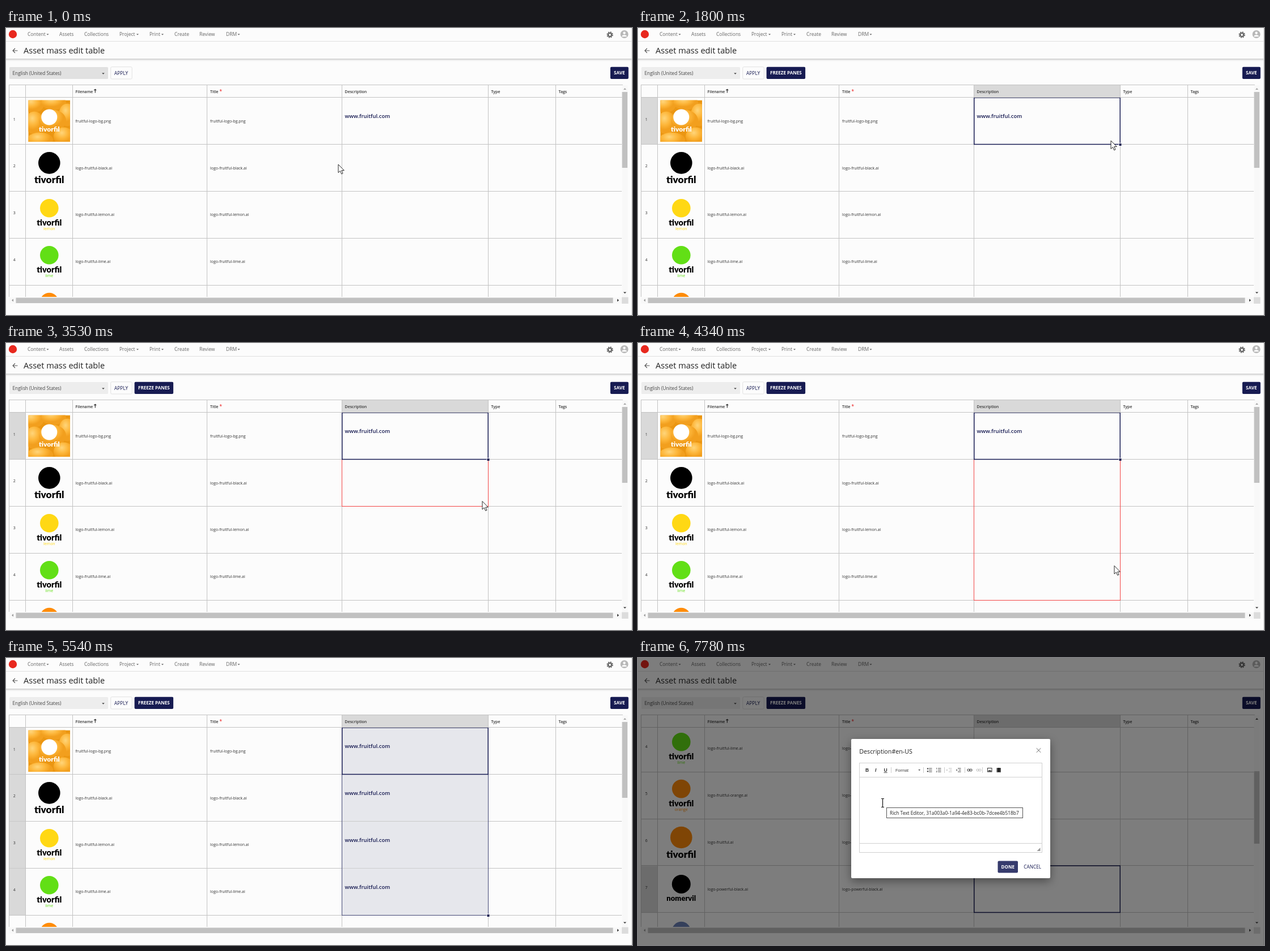
An HTML page for the animation above (8000 ms loop, 1104 by 507 pixels).

```html
<!DOCTYPE html>
<html lang="en">
<head>
<meta charset="utf-8">
<title>Asset mass edit table</title>
<style>
  html, body { margin: 0; width: 100%; height: 100%; overflow: hidden; background: #fcfcfc; }
  svg { display: block; font-family: "Open Sans", "Noto Sans", sans-serif; white-space: pre; }
</style>
</head>
<body>
<svg id="stage" width="1104" height="507" viewBox="0 0 1104 507"></svg>
<script>
const LOOP = 8000, ROW = 82.9, TOP = 123;
const NAVY = '#171b52', GRID = '#c3c3c3', PAGE = '#fcfcfc', MARKED = '#d9d9d9';
const COLS = [5.5, 34.5, 117.5, 354.5, 592.5, 850.5, 969.5];

// Pointer stops: start time, x, y
const STOPS = [
  [0, 586, 241], [560, 626, 209], [710, 641, 195], [860, 644, 191], [980, 645, 188],
  [1410, 690, 191], [1530, 770, 195], [1650, 822, 197], [1800, 834, 199], [1920, 841, 200],
  [2070, 846, 200], [2220, 848, 202], [2340, 849, 203], [2490, 850.5, 205],
  [3110, 848, 212], [3230, 847, 227], [3380, 842, 259], [3530, 840, 279.5],
  [3680, 840, 300], [3800, 840, 328], [3920, 840, 356], [4040, 840, 381],
  [4190, 840, 391], [4340, 840, 393.5], [5270, 902, 422], [5420, 969, 490],
  [5540, 1200, 600], [6800, 645, 393], [7200, 540, 322], [7320, 432.5, 256.5], [7470, 431.5, 256]
];

const ASSETS = [
  { file: 'fruitful-logo-bg.png', photo: true },
  { file: 'logo-fruitful-black.ai', color: '#000' },
  { file: 'logo-fruitful-lemon.ai', color: '#ffd814', sub: 'lemon' },
  { file: 'logo-fruitful-lime.ai', color: '#62df16', sub: 'lime' },
  { file: 'logo-fruitful-orange.ai', color: '#ff8c0a', sub: 'orange' },
  { file: 'logo-fruitful.ai', color: '#ff8c0a' },
  { file: 'logo-powerful-black.ai', color: '#000', word: 'nomervil' },
  { file: '', color: '#6a80b8', word: 'nomervil' }
];

const rect = (x, y, w, h, fill, more = '') =>
  `<rect x="${x}" y="${y}" width="${w}" height="${h}" fill="${fill}" ${more}/>`;
const frame = (x, y, w, h, color, width = 1) =>
  rect(x, y, w, h, 'none', `stroke="${color}" stroke-width="${width}"`);
const path = (d, stroke, width = 1, fill = 'none', more = '') =>
  `<path d="${d}" fill="${fill}" stroke="${stroke}" stroke-width="${width}" ${more}/>`;
const circle = (x, y, r, fill) => `<circle cx="${x}" cy="${y}" r="${r}" fill="${fill}"/>`;
const text = (x, y, s, size, fill = '#333', weight = 400, more = '') =>
  `<text x="${x}" y="${y}" font-size="${size}" fill="${fill}" font-weight="${weight}" ${more}>${s}</text>`;
const caret = (x, y, fill = '#555', r = 2) => path(`M${x - r} ${y}h${2 * r}l${-r} ${r}z`, 'none', 0, fill);
const button = (x, y, w, h, label, fill) =>
  rect(x, y, w, h, fill, 'rx="2"') +
  text(x + w / 2, y + h / 2 + 2.9, label, 8.05, '#fff', 700, 'text-anchor="middle"');
const wordmark = (y, s, size, fill) =>
  text(76.3, y, s, size, fill, 900, 'text-anchor="middle" font-family="Lato, sans-serif"');

function photo(y) {
  const fruit = [[48, 8, 19, 14], [84, 4, 22, 13], [108, 26, 15, 20], [50, 40, 17, 20], [82, 36, 24, 19], [60, 70, 23, 13], [102, 64, 18, 16]];
  return `<svg x="39.5" y="${y}" width="73.5" height="73.5" viewBox="39.5 0 73.5 73.5">` +
    rect(39, 0, 75, 75, '#eb9612') +
    fruit.map(([x, cy, rx, ry]) =>
      `<ellipse cx="${x}" cy="${cy}" rx="${rx}" ry="${ry}" fill="url(#peel)"/>`).join('') +
    circle(76.3, 30, 14, '#fff') + wordmark(55.5, 'tivorfil', 12, '#fff') + '</svg>';
}

function thumb(a, y) {
  if (a.photo) return photo(y + 4.5);
  if (a.word) return circle(76.3, y + 32, 16.5, a.color) + wordmark(y + 62, a.word, 13, '#000');
  if (!a.sub) return circle(76.3, y + 32.5, 19.3, a.color) + wordmark(y + 68, 'tivorfil', 17.3, '#000');
  return circle(76.3, y + 29.5, 16.3, a.color) + wordmark(y + 60, 'tivorfil', 14.5, '#000') +
    text(76.3, y + 68, a.sub, 7, a.color, 500, 'text-anchor="middle"');
}

function header() {
  const nav = [[38, 'Content', 73.5], [94, 'Assets'], [138, 'Collections'], [200, 'Project', 232],
    [253, 'Print', 276], [297, 'Create'], [341, 'Review'], [388, 'DRM', 410.5]];
  return rect(0, 23, 1104, 1, '#e0e0e0') + rect(0, 54.5, 1104, 1.2, '#b4b4b4') + rect(0, 55.7, 1104, 2.5, '#efefef') +
    rect(1103, 0, 1, 507, '#e0e0e0') +
    circle(12, 11, 7.2, '#e8281e') +
    nav.map(([x, s, c]) => text(x, 14.2, s, 8.5, '#666', 500) + (c ? caret(c, 10.5) : '')).join('') +
    `<circle cx="1065" cy="12" r="4.7" fill="none" stroke="#666" stroke-width="2" stroke-dasharray="2.1 1.59"/>` +
    `<circle cx="1065" cy="12" r="3" fill="none" stroke="#666" stroke-width="2.2"/>` +
    circle(1090.5, 11, 7, '#b8b8b8') + circle(1090.5, 8.8, 2.2, '#fff') +
    path('M1086.2 15.2q0-3 4.3-3t4.3 3z', 'none', 0, '#fff') +
    path('M20.5 40H12M16 36l-4 4 4 4', '#555', 1.1) +
    text(31, 45, 'Asset mass edit table', 14.55, '#222', 500);
}

function toolbar(selected) {
  return rect(6, 69, 174, 21, selected ? '#ededed' : '#e1e1e1', 'rx="1.5"') +
    text(11.5, 83, 'English (United States)', 8.28, '#444') + caret(171.5, 79.5, '#333', 2.3) +
    rect(184.7, 68.7, 37.5, 21.3, PAGE, 'rx="2" stroke="#e2e2e2"') + text(191, 82.5, 'APPLY', 8.4, NAVY, 500) +
    (selected ? button(226.6, 68.7, 68.5, 21.4, 'FREEZE PANES', NAVY) : '') +
    button(1065.8, 68.7, 32, 21.4, 'SAVE', NAVY);
}

function tableHead(selected) {
  const label = (x, s) => text(x, 114.6, s, 7, '#333', 600);
  return rect(5, 100, 1083, 22.5, PAGE) + (selected ? rect(592.5, 101, 258, 22, MARKED) : '') +
    label(122.5, 'Filename') + path('M157.3 114.5v-6M155.3 110.2l2-2 2 2', '#222', 1.1) +
    label(360, 'Title') + text(376.5, 115, '*', 8, '#e33', 600) +
    label(597.5, 'Description') + label(855.5, 'Type') + label(974.5, 'Tags') +
    path('M5 100.5H1087.5V123M5 122.5H1087' + COLS.map(x => `M${x} 100.5V123`).join(''), GRID);
}

function scrollbars(scrolled) {
  return rect(1086.5, 101, 10, 374, '#f8f8f8') + rect(5, 476, 1081, 10.5, '#f8f8f8') +
    rect(1086.5, scrolled ? 200 : 113, 9.5, scrolled ? 128 : 134, '#c1c1c1') +
    rect(17.5, 476.5, 1053, 9.5, '#c1c1c1') + rect(1086, 475.5, 11.5, 11.5, '#dcdcdc') +
    path('M1088.9 109l2.5-3 2.5 3z', 'none', 0, scrolled ? '#444' : '#a5a5a5') +
    caret(1091.4, 466.5, '#333', 2.6) +
    path('M13 478.5v5l-3-2.5z', 'none', 0, '#999') + path('M1078 478.5v5l3-2.5z', 'none', 0, '#333');
}

function table({ scroll, from, to, filled, drag }) {
  const rowY = i => TOP + i * ROW - scroll;
  const lineY = i => Math.round(rowY(i)) - .5;
  let s = '';
  ASSETS.forEach((a, i) => {
    const y = rowY(i);
    if (y < TOP - ROW || y > 475) return;
    if (i >= from && i <= to) s += rect(5.5, y, 29, ROW, MARKED);
    s += thumb(a, y) + text(12.7, y + 40.5, i + 1, 7, '#333', 500) +
      text(122.5, y + 43.6, a.file, 6.95) + text(360, y + 43.6, a.file, 6.95);
    if (filled && i <= to) s += rect(592.5, y, 258, ROW, '#e6e7ec');
    if (!scroll && (!i || filled && i <= to)) s += text(597.5, y + 36, 'www.fruitful.com', 9.5, NAVY, 600);
    s += path(`M5 ${lineY(i + 1)}H1086`, GRID);
  });
  s += path(COLS.map(x => `M${x} 123V475`).join(''), GRID);
  if (drag) s += frame(592.5, lineY(1), 258, lineY(1 + drag) - lineY(1), '#f24545');
  if (from >= 0) {
    const top = lineY(from), end = lineY(to + 1);
    if (filled) s += frame(592.5, top, 258, end - top, '#454977');
    s += frame(592.75, top + .5, 257.5, lineY(from + 1) - top - .5, NAVY, 1.5);
    if (!scroll) s += rect(847.5, end - 2.5, 5, 5, PAGE) + rect(848.5, end - 1.5, 4, 4, NAVY);
  }
  return `<g clip-path="url(#body)">${s}</g>`;
}

function listIcon(x, bullets, shift = 0, color = '#444') {
  return path([195, 198, 201].map((y, i) => `M${x - 1 + (i === 1 ? shift : 0)} ${y}H${x + 4.5}`).join(''), color, 1.2) + bullets;
}

function dialog(hover) {
  const tools = [['B', 401, 700, ''], ['I', 418, 700, 'font-style="italic"'], ['U', 433.5, 700, 'text-decoration="underline"']];
  const sans = ' font-family="Liberation Sans, sans-serif"';
  const link = (x, color) => `<g fill="none" stroke="${color}" stroke-width="1.1">` +
    `<rect x="${x - 4}" y="196.3" width="4.3" height="3.4" rx="1.5"/><rect x="${x - .3}" y="196.3" width="4.3" height="3.4" rx="1.5"/></g>`;
  const dots = circle(511, 195.5, 1.2, '#444') + circle(511, 200.3, 1.2, '#444');
  const nums = text(525.6, 197.3, '1', 4, '#444', 700) + text(525.6, 202, '2', 4, '#444', 700);
  return rect(0, 0, 1104, 507, 'rgba(0,0,0,.5)') +
    rect(376, 143, 351, 246, '#fff', 'rx="2" style="filter:drop-shadow(0 5px 8px rgba(0,0,0,.4))"') +
    text(390.3, 169, 'Description#en-US', 10.7, '#222', 500) +
    path('M702.7 159.3l7.6 7.6m0-7.6l-7.6 7.6', '#666', 1) +
    frame(390.5, 185.5, 322, 158, '#d0d0d0') + path('M390.5 210.5h322M390.5 327.5h322', '#d0d0d0') +
    tools.map(([s, x, w, more]) => text(x, 201, s, 8.5, '#333', w, more + sans)).join('') +
    path([446.5, 503.5, 540.5, 576.5, 607.5].map(x => `M${x} 193v10`).join(''), '#ccc') +
    text(454, 200.6, 'Format', 7.3, '#444', 400, sans) + caret(496.2, 197, '#444') +
    listIcon(514, dots) + listIcon(530, nums) +
    listIcon(549, path('M545.5 196.3l-2 1.7 2 1.7z', 'none', 0, '#bbb'), 1.5, '#bbb') +
    listIcon(565, path('M561.5 196.3l2 1.7-2 1.7z', 'none', 0, '#444'), 1.5) +
    link(585, '#444') + link(601, '#c4c4c4') +
    rect(616.5, 194.5, 7.5, 6.5, '#fff', 'stroke="#333"') + path('M617 200.5l2.3-3 1.6 1.6 1.2-1 1.7 2.4z', 'none', 0, '#333') +
    rect(632.5, 194, 7.5, 7.8, '#222') + path('M633.4 194v8M639.1 194v8', '#fff', .7, 'none', 'stroke-dasharray="1 1"') +
    path('M709.5 335v6h-6z', 'none', 0, '#999') +
    button(634.5, 358.5, 35.5, 21, 'DONE', hover ? '#363b6d' : NAVY) +
    text(680.3, 371.6, 'CANCEL', 8.25, NAVY, 500);
}

function pointer(x, y, t) {
  let shape = path('M0 0V14.5L3.4 11.4 5.7 16.8 8 15.8 5.8 10.6H10.3Z', '#111', .9, '#fff');
  if (t >= 2490 && t < 3110) shape = path('M-8 0H8M0-8V8', '#111', 1);
  if (t >= 7320) shape = path('M-2.5-7.5h2l.5.5.5-.5h2M0-7V7M-2.5 7.5h2l.5-.5.5.5h2', '#111', 1.2);
  return `<g transform="translate(${x} ${y})">${shape}</g>`;
}

function scene(t) {
  const [, x, y] = STOPS.findLast(stop => stop[0] <= t);
  const selected = t >= 1130, open = t >= 6800, filled = t >= 4770 && !open;
  const drag = t >= 3110 && t < 4770 ? Math.floor((y - TOP) / ROW) : 0;
  const from = open ? 6 : selected ? 0 : -1;
  const to = filled ? 3 : from;
  return `<defs><clipPath id="body"><rect x="5" y="122" width="1081" height="353"/></clipPath>
    <radialGradient id="peel" cx=".4" cy=".3"><stop stop-color="#ffd57a"/><stop offset=".6" stop-color="#fdb63a"/><stop offset="1" stop-color="#f29f1e"/></radialGradient></defs>` +
    rect(0, 0, 1104, 507, PAGE) + header() + toolbar(selected) +
    table({ scroll: open ? 253 : 0, from, to, filled, drag }) + tableHead(selected) + scrollbars(open) +
    (open ? dialog(t >= 6950) : '') + pointer(x, y, t) +
    (t >= 7780 ? rect(438.5, 264.5, 240, 18, '#fff', 'stroke="#555"') +
      text(444, 276.5, 'Rich Text Editor, 31a003a0-1a94-4e83-bc0b-7dcee4b518b7', 8.4, '#222') : '');
}

const stage = document.getElementById('stage');
const start = performance.now();
let shown = '';
function tick() {
  const next = scene((performance.now() - start) % LOOP);
  if (next !== shown) stage.innerHTML = shown = next;
  requestAnimationFrame(tick);
}
tick();
</script>
</body>
</html>
```
